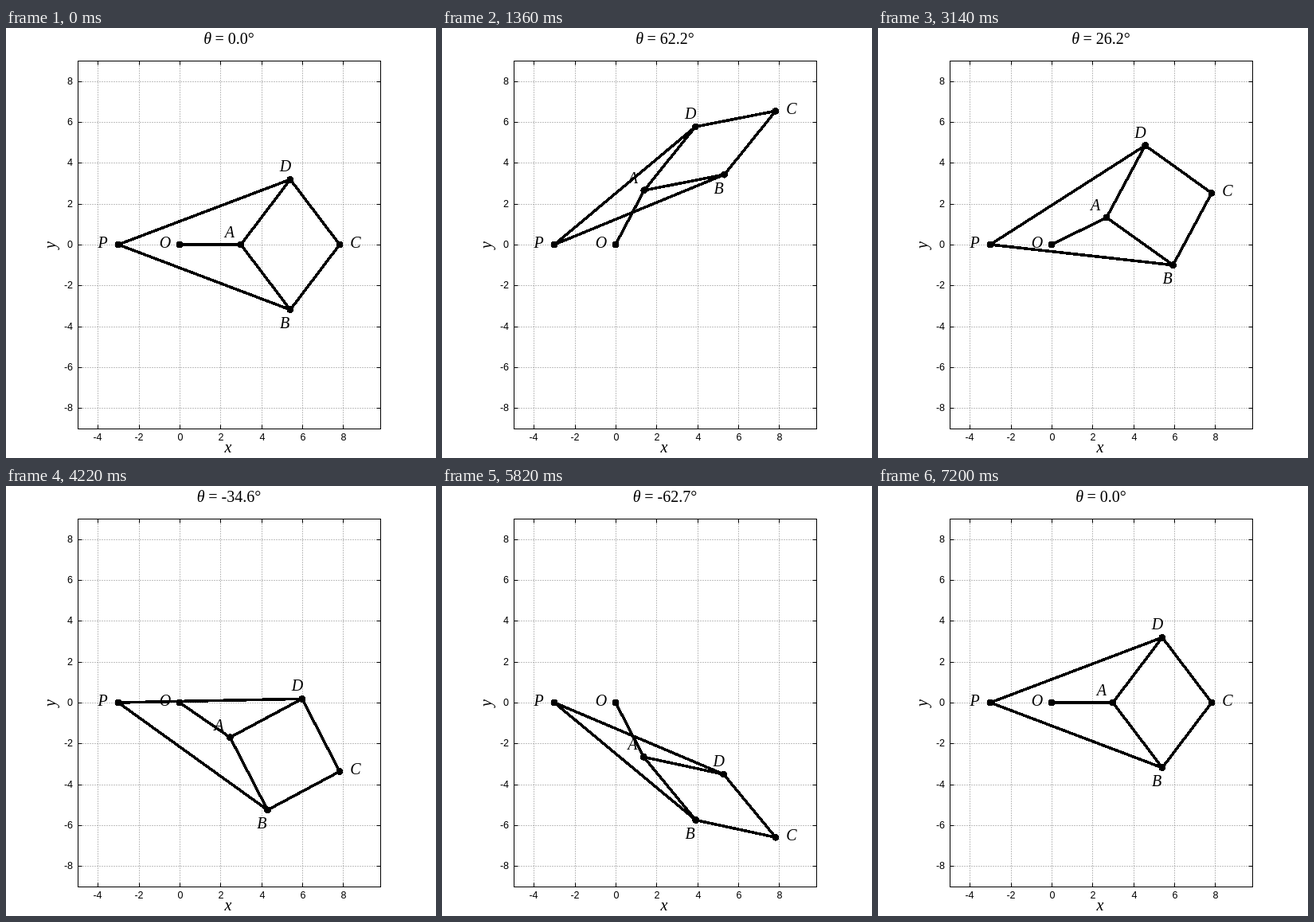
These frames come from a looping animation (540x540 px, 7220 ms). An HTML page:

```html
<!DOCTYPE html>
<html lang="en">
<head>
<meta charset="utf-8">
<title>Straight-line linkage</title>
<style>
  html, body { margin: 0; width: 100%; height: 100%; overflow: hidden; background: #fff; }
  svg { display: block; width: 540px; height: 540px; }
  text { fill: #000; text-anchor: middle; }
  .math { font: 20px "Liberation Serif", "Times New Roman", serif; }
  .it { font-style: italic; }
  .tick { font: 12.5px "Liberation Sans", Arial, sans-serif; }
  .grid { stroke: #808080; stroke-width: 1; stroke-dasharray: 1 2; }
  .axis { stroke: #000; stroke-width: 1; fill: none; }
  .rod { stroke: #000; stroke-width: 3.6; fill: none; stroke-linejoin: round; stroke-linecap: round; }
  .rod, circle { shape-rendering: crispEdges; }
</style>
</head>
<body>
<svg id="stage" viewBox="0 0 540 540">
  <text class="math" x="280" y="19.5"><tspan class="it">θ</tspan><tspan dx="-0.5"> = </tspan><tspan id="angle">0.0°</tspan></text>
  <text class="math it" x="279" y="533">x</text>
  <text class="math it" transform="translate(61.5 272.5) rotate(-90)">y</text>
</svg>
<script>
const svg = document.getElementById('stage');
const angle = document.getElementById('angle');

function add(tag, attrs, text) {
  const el = document.createElementNS('http://www.w3.org/2000/svg', tag);
  for (const k in attrs) el.setAttribute(k, attrs[k]);
  if (text !== undefined) el.textContent = text;
  svg.appendChild(el);
  return el;
}

const UNIT = 25.66;
const toX = x => 218 + UNIT * x;
const toY = y => 272 - UNIT * y;
const snap = v => Math.floor(v + 0.42) + 0.5;
const box = { l: 90.5, r: 470.5, t: 41.5, b: 503.5 };
const line = (cls, x1, y1, x2, y2) => add('line', { class: cls, x1, y1, x2, y2 });

for (let v = -8; v <= 8; v += 2) {
  const y = snap(toY(v));
  line('grid', box.l, y, box.r, y);
  line('axis', box.l, y, box.l + 5, y);
  line('axis', box.r - 5, y, box.r, y);
  add('text', { class: 'tick', x: 84, y: y + 3, style: 'text-anchor:end' }, v);
  if (v < -4) continue;
  const x = snap(toX(v));
  line('grid', x, box.t, x, box.b);
  line('axis', x, box.t, x, box.t + 5);
  line('axis', x, box.b - 5, x, box.b);
  add('text', { class: 'tick', x: x + (v < 0 ? -0.5 : 0.5), y: 518 }, v);
}
add('rect', { class: 'axis', x: box.l, y: box.t, width: box.r - box.l, height: box.b - box.t });

// label offsets from each joint
const offsets = { P: [-19.5, 3.5], O: [-18, 3.5], A: [-14, -9], B: [-7, 23.5], C: [20, 3.5], D: [-6, -10] };
const rods = add('path', { class: 'rod' });
const joints = Object.entries(offsets).map(([name, off]) => ({
  name, off,
  dot: add('circle', { r: 4.5 }),
  label: add('text', { class: 'math it' }, name)
}));

// crank 3, long arms 9, rhombus side 4; the swing ends where the rhombus folds flat
const CRANK = 3, ARM = 9, SIDE = 4;
const SWING = Math.acos(7 / 18);
const STEP = 20, COUNT = 361;

function linkage(theta) {
  const half = theta / 2, c = Math.cos(half), s = Math.sin(half);
  const near = 2 * CRANK * c;
  const far = (ARM * ARM - SIDE * SIDE) / near;
  const mid = (near + far) / 2;
  const h = Math.sqrt(Math.max(0, SIDE * SIDE - (far - mid) ** 2));
  const at = (u, v) => [toX(u * c - v * s - CRANK), toY(u * s + v * c)];
  return { P: at(0, 0), O: [toX(0), toY(0)], A: at(near, 0), B: at(mid, -h), C: at(far, 0), D: at(mid, h) };
}

function draw(now) {
  const step = Math.floor(now / STEP) % COUNT;
  const theta = SWING * Math.sin(step * Math.PI / 180);
  const p = linkage(theta);
  const path = names => 'M' + [...names].map(n => p[n].map(v => v.toFixed(2)).join(' ')).join('L');
  rods.setAttribute('d', path('OA') + path('PDCBP') + path('DAB'));
  for (const { name, off, dot, label } of joints) {
    const [x, y] = p[name];
    dot.setAttribute('cx', x);
    dot.setAttribute('cy', y);
    label.setAttribute('x', x + off[0]);
    label.setAttribute('y', y + off[1]);
  }
  const deg = (theta * 180 / Math.PI).toFixed(1);
  angle.textContent = (deg === '-0.0' ? '0.0' : deg) + '°';
}

function tick() {
  draw(performance.now());
  requestAnimationFrame(tick);
}
draw(0);
requestAnimationFrame(tick);
</script>
</body>
</html>
```
